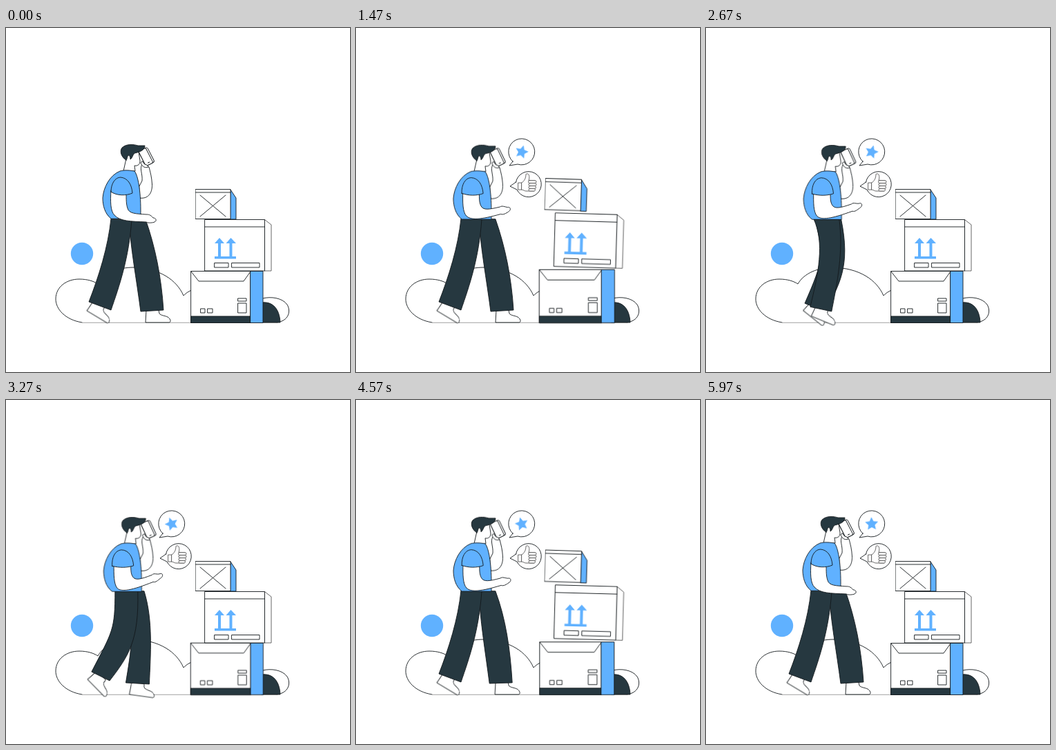
Recreate the animation shown at these times as an HTML page. Size 498 by 500 pixels, loop 6010 ms.

```html
<!DOCTYPE html>
<html lang="en">
<head>
<meta charset="utf-8">
<title>Delivery call</title>
<style>
:root { --loop: 6010ms; --blue: #60b1ff; --dark: #263840; --line: #14191c; }
html, body { margin: 0; width: 100%; height: 100%; overflow: hidden; background: #fff; }
svg { display: block; width: 498px; height: 500px; }
.ink { fill: #fff; stroke: var(--line); stroke-width: .9; stroke-linejoin: round; stroke-linecap: round; }
.blue { fill: var(--blue); }
.dark { fill: var(--dark); }
.none { fill: none; }
.flat { stroke: none; }
.soft { stroke: #555; }

/* walk */
.leg, .foot { animation: calc(var(--loop) / 4) linear infinite; }
.near.leg { animation-name: near-leg; }
.far.leg { animation-name: far-leg; }
.near.foot { animation-name: near-foot; }
.far.foot { animation-name: far-foot; }
@keyframes near-leg {
  0%, 4.7%, 97%, 100% { d: path("M152 277C148 318 134 362 120 398L152 410C164 375 178 335 182 278Z"); }
  18% { d: path("M158 278C158 335 155 335 124 395L150 408C178 372 193 350 191 278Z"); }
  38% { d: path("M160 280C178 330 187 335 161 405L194 416C206 375 226 345 200 278Z"); }
  50% { d: path("M163 279C179 312 189 362 195 412L228 410C226 362 220 318 200 278Z"); }
  55.3% { d: path("M158 279C180 305 188 345 190 413L223 413C222 360 220 315 198 278Z"); }
  58% { d: path("M160 279C179 303 187 345 187 413L221 415C220 360 218 315 197 278Z"); }
  68% { d: path("M160 278C185 320 180 370 173 411L207 413C209 370 213 320 198 278Z"); }
  87% { d: path("M152 277C160 305 146 345 130 400L158 411C172 370 186 330 188 278Z"); }
}
@keyframes far-leg {
  0%, 97%, 100% { d: path("M178 278C180 318 189 365 195 412L228 410C225 362 216 318 202 278Z"); }
  4.7% { d: path("M178 278C179 318 187 365 193 412L226 411C223 362 217 318 202 278Z"); }
  18% { d: path("M170 278C190 320 180 370 173 411L207 413C209 370 213 320 200 278Z"); }
  38% { d: path("M152 277C172 300 148 345 130 400L158 411C170 370 185 330 190 278Z"); }
  55.3%, 58% { d: path("M152 277C172 300 157 325 118 387L144 405C165 380 185 350 190 278Z"); }
  68% { d: path("M156 278C162 330 155 335 124 395L150 408C178 372 193 350 191 278Z"); }
  87% { d: path("M160 280C178 330 187 335 161 405L194 416C206 375 226 345 200 278Z"); }
}
@keyframes near-foot {
  0%, 4.7%, 97%, 100% { transform: translate(117px, 411px) rotate(31deg); }
  18% { transform: translate(118px, 406px) rotate(46deg); }
  38% { transform: translate(162px, 415px) rotate(32deg); }
  50% { transform: translate(202px, 428px) rotate(0deg); }
  55.3% { transform: translate(191px, 428px) rotate(0deg); }
  58% { transform: translate(187px, 428px) rotate(2deg); }
  68% { transform: translate(178px, 428px) rotate(8deg); }
  87% { transform: translate(128px, 410px) rotate(36deg); }
}
@keyframes far-foot {
  0%, 97%, 100% { transform: translate(202px, 428px) rotate(0deg); }
  4.7% { transform: translate(201px, 428px) rotate(0deg); }
  18% { transform: translate(178px, 428px) rotate(8deg); }
  38% { transform: translate(128px, 410px) rotate(36deg); }
  55.3%, 58% { transform: translate(112px, 401px) rotate(45deg); }
  68% { transform: translate(118px, 406px) rotate(46deg); }
  87% { transform: translate(162px, 415px) rotate(32deg); }
}

/* talking gestures */
.body, .phone, .arm, .sleeve { animation: calc(var(--loop) / 6) cubic-bezier(.37, 0, .63, 1) infinite alternate; }
.body { animation-name: sway; }
.phone { animation-name: tilt; transform-origin: 204px 205px; }
.arm { animation-name: arm; }
.sleeve { animation-name: sleeve; }
@keyframes sway { to { transform: translate(1.6px, 1.3px); } }
@keyframes tilt { to { transform: translate(1px, 0) rotate(3deg); } }
@keyframes arm {
  from { d: path("M152 236C151 252 151 266 157 272C165 281 180 281 203 282C206 284 213 283 215 282C219 280 217 276 213 276C209 271 206 271 203 271C188 270 178 270 176 262C174 256 174 250 174 240Z"); }
  to { d: path("M157 240C157 254 157 268 162 274C168 279 182 276 215 261C219 262 221 258 225 255C231 251 228 246 225 248C220 251 216 247 213 251C196 259 189 261 185 256C182 252 182 247 182 240Z"); }
}
@keyframes sleeve {
  from { d: path("M152 238C152 226 158 217 166 217C176 218 182 227 183 240C174 244 160 244 152 238Z"); }
  to { d: path("M154 242C153 229 158 219 167 218C178 218 184 228 185 241C175 244 165 244 154 242Z"); }
}

/* boxes */
.low, .mid, .top { animation: calc(var(--loop) / 2) ease-in-out infinite; }
.low { animation-name: low; transform-origin: 320px 428px; }
.mid { animation-name: mid; transform-origin: 375px 353px; }
.top { animation-name: top; transform-origin: 333px 278px; }
@keyframes low {
  0%, 3%, 67%, 100% { transform: scale(1, 1); }
  28%, 40% { transform: scale(1.058, 1.04); }
}
@keyframes mid {
  0%, 11%, 72%, 100% { transform: translate(0, 0) rotate(0deg) scale(1, 1); }
  27.7% { transform: translate(1px, -3px) rotate(2.2deg) scale(1.03, 1); animation-timing-function: linear; }
  40% { transform: translate(1px, -4px) rotate(2deg) scale(1.035, 1.04); animation-timing-function: linear; }
  52.3% { transform: translate(1.5px, -4px) rotate(1.5deg) scale(1.03, 1.045); }
}
@keyframes top {
  0%, 12%, 80%, 100% { transform: translate(0, 0) rotate(0deg) scale(1, 1); }
  27.7% { transform: translate(0, -5px) rotate(2deg) scale(1.01, 1.01); animation-timing-function: linear; }
  40% { transform: translate(0, -10.5px) rotate(2deg) scale(1.02, 1.04); animation-timing-function: linear; }
  52.3% { transform: translate(.5px, -12px) rotate(1.8deg) scale(1.035, 1.06); }
  69% { transform: translate(0, -2px) rotate(1.8deg) scale(1.01, 1.01); }
}

/* speech bubbles */
.pop { animation: pop var(--loop) infinite; }
.star { animation: spin var(--loop) linear infinite; transform-origin: 239.8px 180.2px; }
@keyframes pop {
  0%, 1% { transform: scale(0); animation-timing-function: ease-in-out; }
  10% { transform: scale(1.05); animation-timing-function: ease-in-out; }
  16%, 100% { transform: scale(1); }
}
@keyframes spin { to { transform: rotate(360deg); } }
</style>
</head>
<body>
<svg viewBox="0 0 498 500">
  <!-- backdrop -->
  <g class="ink none">
    <path d="M110 428C85 424 72 408 72 394C72 376 88 365 106 365C118 365 127 368 133 372C142 356 163 348 184 348C222 349 247 366 257 389C262 384 267 381 275 379"/>
    <path d="M372 393C383 390 400 392 407 402C413 412 409 426 392 428"/>
    <path d="M110 428.300H392" stroke="#999"/>
  </g>
  <circle class="blue" cx="110" cy="328" r="16.200"/>
  <path class="ink dark" d="M370 399C386 397 396 408 397 428H370Z"/>

  <!-- boxes -->
  <g class="low ink">
    <path d="M268 353.500H354V428.500H268Z"/>
    <path class="dark" d="M268 419H354V428.500H268Z"/>
    <path class="blue" d="M354 353.500H372V428.500H354Z"/>
    <path class="none" d="M268 354L279 368H344L354 354M282 408h6v6h-6zM292 408h7v6h-7zM336 393h12v4h-12zM336 400h12v14h-12z"/>
  </g>
  <g class="mid ink">
    <path class="soft" d="M374.500 278.500L384 286V353H374.500Z"/>
    <path d="M288 278.500H374.500V353H288ZM288 289H374.500"/>
    <path class="none" d="M302 341.500h20v6.500h-20zM327 341.500h40v6.500h-40z"/>
    <path class="blue flat" d="M302 332H333V335.500H302ZM309 305L316 313H311V332H307V313H302ZM325.500 305L333 313H327.500V332H323.500V313H318.500Z"/>
  </g>
  <g class="top ink">
    <path class="blue" d="M325 235L333 247V278H325Z"/>
    <path d="M274.500 234.500H325V277.500H274.500ZM274.500 239H325M281 243L318 274M318 243L281 274"/>
  </g>

  <!-- courier -->
  <g class="ink">
    <path class="far foot" d="M1 -18L0 0H34C37 0 37 -5 32 -8C28 -10 22 -10 20 -13L19 -18Z"/>
    <path class="far leg dark" d="M178 278C180 318 189 365 195 412L228 410C225 362 216 318 202 278Z"/>
    <path class="near foot" d="M1 -18L0 0H34C37 0 37 -5 32 -8C28 -10 22 -10 20 -13L19 -18Z"/>
    <path class="near leg dark" d="M152 277C148 318 134 362 120 398L152 410C164 375 178 335 182 278Z"/>
    <g class="body">
      <path d="M174 190L170 208H187L186 200C191 201 194 198 194 193L192 180H178Z"/>
      <path d="M193 247C205 249 212 241 211.500 227C211 217 209 210 207 202L197 198C193 205 198 212 197 222L193 230Z"/>
      <path class="blue" d="M152 277C143 270 140 258 140 247C141 232 150 214 165 208C172 206 180 207 186 208C191 214 195 236 195 265V277Z"/>
      <g class="phone">
        <g transform="translate(203.500 187) rotate(-27)">
          <rect x="-7" y="-12" width="14" height="24" rx="2.500"/>
          <rect x="-7" y="-12" width="11.500" height="24" rx="2"/>
          <path class="none" d="M-2.500 9H0"/>
        </g>
        <path d="M195 196C197 202 202 204 206 202L204 199C201 199 199 197 198 194Z"/>
      </g>
      <path class="dark" d="M174 192C167 188 164 179 168 174C174 168 185 169 191 171L201 171C201 177 195 180 186 182C183 185 183 189 180 191C180 188 179 185 177 185C175 187 176 190 174 192Z"/>
    </g>
    <path class="arm" d="M152 236C151 252 151 266 157 272C165 281 180 281 203 282C206 284 213 283 215 282C219 280 217 276 213 276C209 271 206 271 203 271C188 270 178 270 176 262C174 256 174 250 174 240Z"/>
    <path class="sleeve blue" d="M152 238C152 226 158 217 166 217C176 218 182 227 183 240C174 244 160 244 152 238Z"/>
  </g>

  <!-- bubbles -->
  <g class="pop ink" style="transform-origin: 222px 200px">
    <path d="M227 194L222 200L234 198A19 19 0 1 0 227 194Z"/>
    <path class="star blue flat" d="M239.800 170.200L242.700 176.300L249.300 177.100L244.400 181.700L245.700 188.300L239.800 185.100L233.900 188.300L235.200 181.700L230.300 177.100L236.900 176.300Z"/>
  </g>
  <g class="pop ink" style="transform-origin: 223px 230px">
    <path d="M231.500 224L223 230L233 235A18.500 18.500 0 1 0 231.500 224Z"/>
    <g class="soft">
      <path d="M235 225H240V235H235Z"/>
      <path d="M240 225C244 222 246 218 246 212.500C250 210 252 215 250 222H258V237H246C244 237 242 235 240 235Z"/>
      <rect x="249.500" y="221.500" width="11.500" height="4" rx="2"/>
      <rect x="250" y="225.500" width="11" height="4" rx="2"/>
      <rect x="250" y="229.500" width="10.500" height="4" rx="2"/>
      <rect x="250" y="233.500" width="9.500" height="3.500" rx="1.700"/>
    </g>
  </g>
</svg>
</body>
</html>
```
